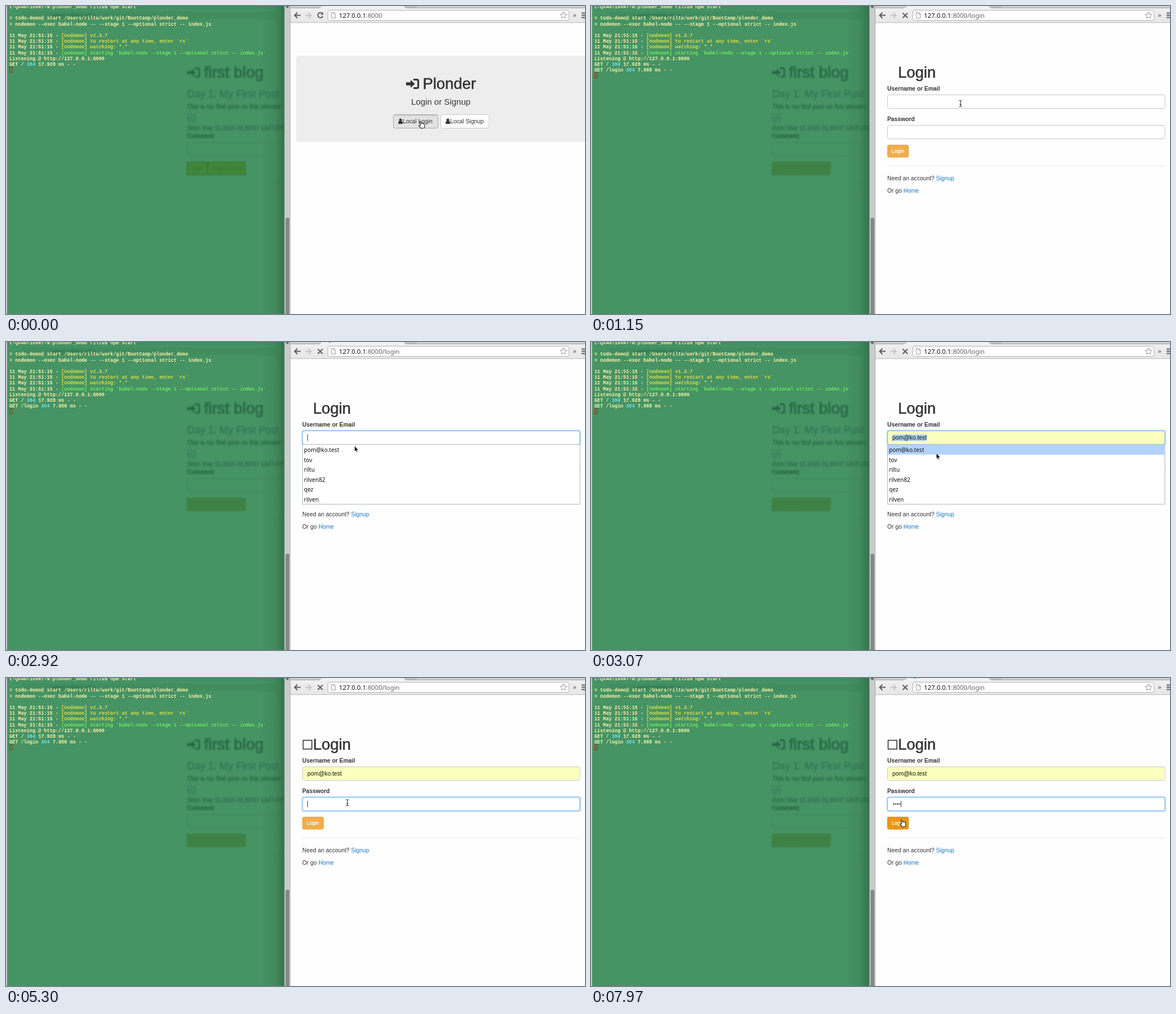
An HTML page for the animation above (8000 ms loop, 1026x546 px).

```html
<!DOCTYPE html>
<html lang="en">
<head>
<meta charset="utf-8">
<title>Login demo</title>
<style>
  html, body { margin: 0; width: 100%; height: 100%; overflow: hidden; background: #fff; }
  svg { display: block; width: 1026px; height: 546px; }
  text { white-space: pre; font: 10.3px "Liberation Sans", Arial, sans-serif; fill: #333; }
  .term text { font: bold 8.52px "Liberation Mono", "Courier New", monospace; fill: #fdf3a8; }
  .term .y { fill: #dede45; }
  .term .g { fill: #69ea62; }
  .term .c { fill: #74e0ee; }
  .ghost { filter: blur(.8px); }
  .ghost text { fill: #296a48; stroke: #296a48; stroke-width: .4px; }
  .ghost .big { font-size: 27.9px; stroke-width: .9px; }
  .ghost .post { font-size: 18.1px; fill: #33785a; stroke: #33785a; }
  .bar { fill: none; stroke: #5c5c5c; stroke-width: 2; }
  text.url { font: 11.3px "Noto Sans", "Open Sans", sans-serif; fill: #111; }
  .url tspan { fill: #606060; }
  text.h1 { font-size: 27.4px; stroke: #333; stroke-width: .5px; }
  text.lead { font-size: 15px; }
  text.bold { font-weight: bold; }
  text.email { fill: #111; }
  .link { fill: #1c78cc; }
  .field { fill: #fff; stroke: #c6c6c6; }
  .focus { fill: none; stroke: #66afe9; }
  .glow { fill: none; stroke: #66afe9; stroke-width: 3; opacity: .35; filter: blur(1px); }
  text.btn { font-size: 8.9px; fill: #fff; stroke: #fff; stroke-width: .25px; }
  .menu text { font: 10px "Noto Sans", "Open Sans", sans-serif; fill: #111; }
</style>
</head>
<body>
<svg viewBox="0 0 1026 546">
  <defs>
    <linearGradient id="shade">
      <stop offset="0" stop-color="#173f2a" stop-opacity="0"/>
      <stop offset=".55" stop-color="#173f2a" stop-opacity=".08"/>
      <stop offset="1" stop-color="#173f2a" stop-opacity=".36"/>
    </linearGradient>
    <linearGradient id="chrome" x2="0" y2="1">
      <stop offset="0" stop-color="#f2f2f2"/>
      <stop offset="1" stop-color="#e6e6e6"/>
    </linearGradient>
    <clipPath id="pane"><path d="M2 0H493V546H2Z"/></clipPath>
    <path id="signin" d="M0 7.2H8V3L15.5 10 8 17V12.8H0ZM13 1H19.5Q23 1 23 4.5V15.500Q23 19 19.500 19H13V16H18.500Q20 16 20 14.500V5.500Q20 4 18.500 4H13Z"/>
    <path id="user" d="M4 0a2.400 2.600 0 0 1 0 5.200a2.400 2.600 0 0 1 0-5.200M1.800 4.300Q4 6.600 6.200 4.300 8 4.800 8 8 8 9.500 6.700 9.500H1.300Q0 9.500 0 8 0 4.800 1.800 4.300Z"/>
  </defs>

  <!-- terminal -->
  <rect width="503" height="546" fill="#c9cdca"/>
  <g clip-path="url(#pane)">
    <rect x="2" width="491" height="546" fill="#469364"/>
    <g class="ghost">
      <path d="M2 0H493V5H2ZM30 10H480V24H30Z" fill="#347d55" opacity=".22"/>
      <path d="M82 14H158V20H82Z" fill="#296a48" opacity=".35"/>
      <use href="#signin" x="321" y="108" fill="#296a48"/>
      <text class="big" x="351" y="127">first blog</text>
      <text class="post" x="321" y="162">Day 1: My First Post</text>
      <text x="321" y="182" style="font-size:10.8px">This is my first post on this plonder</text>
      <path d="M322.500 192.500H335V204H322.500ZM324 202L328 197 331 200 333 198" fill="none" stroke="#377f62" stroke-width="1.500"/>
      <text x="321" y="220" opacity=".8">(Mon May 11 2015 01:49:07 GMT-0700</text>
      <text class="bold" x="321" y="234">Comment</text>
      <path d="M321 242H487M321 266H487M321 242V266" fill="none" stroke="#3b855a" opacity=".6"/>
      <path d="M473 313H490" stroke="#3b855a" stroke-dasharray="2" opacity=".6"/>
      <g data-on="0-240">
        <path d="M321 277H356V299H321ZM358 277H424V299H358Z" fill="#418639" stroke="#397c38" stroke-linejoin="round" stroke-width="2"/>
        <text x="330" y="291" style="font-size:8.900px" opacity=".45">Post</text>
        <text x="366" y="291" style="font-size:8.900px" opacity=".45">Login to Post</text>
      </g>
      <g data-on="240-8000">
        <rect x="320" y="276" width="105" height="24" rx="3" fill="#3f8145"/>
        <path d="M356.500 277V299" stroke="#397b46"/>
        <path d="M482 50V335" stroke="#6c9c42" stroke-width="3" opacity=".18"/>
      </g>
    </g>
    <rect x="452" width="41" height="546" fill="url(#shade)"/>
    <g class="term">
      <text x="6" y="3.900">L-QX40718VRT-N:plonder_demo riltu$ npm start</text>
      <text x="6" y="24.300">&gt; todo-demo@ start /Users/riltu/work/git/BootCamp/plonder_demo</text>
      <text x="6" y="34.500">&gt; nodemon --exec babel-node -- --stage 1 --optional strict -- index.js</text>
      <text x="6" y="54.900">11 May 21:51:15 - <tspan class="y">[nodemon] v1.3.7</tspan></text>
      <text x="6" y="65.100">11 May 21:51:15 - <tspan class="y">[nodemon] to restart at any time, enter `rs`</tspan></text>
      <text x="6" y="75.300">11 May 21:51:15 - <tspan class="y">[nodemon] watching: *.*</tspan></text>
      <text x="6" y="85.500">11 May 21:51:15 - <tspan class="g">[nodemon] starting `babel-node --stage 1 --optional strict -- index.js`</tspan></text>
      <text x="6" y="95.700">Listening @ http://127.0.0.1:8000</text>
      <text x="6" y="105.900">GET / <tspan class="c">304</tspan> 17.928 ms - -</text>
      <text x="6" y="116.100" data-on="240-8000">GET /login <tspan class="c">304</tspan> 7.888 ms - -</text>
      <rect id="prompt" x="6.500" width="4.500" height="9" fill="none" stroke="#963010"/>
    </g>
  </g>
  <path d="M493.500 0V546" stroke="#8fa398"/>
  <path d="M495.500 546V378.500a3.250 3.250 0 0 1 6.500 0V546Z" fill="#858585"/>
  <path d="M496 0H501V2L498.500 4 496 2Z" fill="#666"/>

  <!-- browser -->
  <rect x="503" width="523" height="546" fill="#fefefe"/>
  <rect x="503" width="523" height="30" fill="url(#chrome)"/>
  <path d="M503 0H559L556 3.500H503ZM705 0H1026V3.500H710Z" fill="#cfcfcf"/>
  <path d="M503 3.500H554Q557 3.500 559 0M705 0Q707 3.500 710 3.500H1026M707 0L709 2H726L728 0" fill="none" stroke="#a6a6a6"/>
  <path d="M503 29.500H1026" stroke="#bcbcbc"/>
  <path d="M503.500 0V546" stroke="#a9a9a9"/>
  <path id="spin" d="M-4 -4.500A6 6 0 0 1 4 -4.500" fill="none" stroke="#3c9be8" stroke-width="2"/>
  <path class="bar" d="M522 16.500H512M516.500 11.500L511.500 16.500 516.500 21.500"/>
  <path class="bar" d="M530 16.500H540M535.500 11.500L540.500 16.500 535.500 21.500" style="stroke:#c6c6c6"/>
  <g data-on="0-240">
    <path class="bar" d="M560.500 13.300A4.500 4.500 0 1 0 561.300 18"/>
    <path d="M562 10.800V15.500H557.300Z" fill="#5c5c5c"/>
  </g>
  <path class="bar" data-on="240-8000" d="M552.500 12.500L561 21M561 12.500L552.500 21"/>
  <rect x="570.500" y="7.500" width="427" height="18" rx="2.500" fill="#fff" stroke="#b4b4b4"/>
  <path d="M576.500 11.500H581L583.500 14V21.500H576.500ZM581 11.500V14H583.500" fill="#fafafa" stroke="#9b9b9b"/>
  <text class="url" x="590" y="20.500">127.0.0.1<tspan>:8000<tspan data-on="240-8000">/login</tspan></tspan></text>
  <path d="M988 10.300L989.800 14.300 994 14.700 990.800 17.500 991.800 21.800 988 19.500 984.200 21.800 985.200 17.500 982 14.700 986.200 14.300Z" fill="#fff" stroke="#9a9a9a"/>
  <text x="1004.500" y="20" style="font-size:11px;fill:#444">»</text>
  <path class="bar" d="M1020 12.500H1026M1020 16.500H1026M1020 20.500H1026"/>

  <!-- welcome page -->
  <g data-on="0-240">
    <rect x="514" y="88" width="520" height="153" rx="4.500" fill="#ededed"/>
    <use href="#signin" x="709" y="128" fill="#333"/>
    <text class="h1" x="738.500" y="147">Plonder</text>
    <text class="lead" x="718" y="174.500">Login or Signup</text>
    <rect x="686.500" y="192.500" width="79" height="24" rx="3" fill="#e3e3e3" stroke="#a8a8a8"/>
    <path d="M688 194H764.500" stroke="#cfcfcf" stroke-width="2"/>
    <rect x="770.500" y="192.500" width="85.500" height="24" rx="3" fill="#fff" stroke="#c9c9c9"/>
    <use href="#user" x="695" y="199.500" fill="#333"/>
    <text x="703" y="208.300">Local Login</text>
    <use href="#user" x="779" y="199.500" fill="#333"/>
    <text x="787" y="208.300">Local Signup</text>
  </g>

  <!-- login page -->
  <g data-on="240-8000">
    <rect data-on="3220-8000" x="526.500" y="110.500" width="15.500" height="15.500" fill="none" stroke="#333" stroke-width="1.600"/>
    <text class="h1" x="544" y="126.800">Login</text>
    <text class="bold" x="525" y="150">Username or Email</text>
    <text class="bold" x="525" y="204">Password</text>
    <rect class="glow" data-on="1600-4410" x="525" y="157" width="492.500" height="25" rx="3"/>
    <rect class="glow" data-on="4410-8000" x="525" y="211" width="492.500" height="25" rx="3"/>
    <rect class="field" x="525.500" y="157.500" width="491.500" height="24" rx="3"/>
    <rect class="field" x="525.500" y="211.500" width="491.500" height="24" rx="3"/>
    <rect data-on="2930-8000" x="526" y="158" width="490.500" height="23" rx="2.500" fill="#faffbd"/>
    <rect class="focus" data-on="1600-4410" x="525.500" y="157.500" width="491.500" height="24" rx="3"/>
    <rect class="focus" data-on="4410-8000" x="525.500" y="211.500" width="491.500" height="24" rx="3"/>
    <rect data-on="2930-3370" x="534" y="164" width="61" height="11.500" fill="#abd0ee"/>
    <text class="email" data-on="2930-8000" x="534" y="173">pom@ko.test</text>
    <g id="dots" fill="#444"></g>
    <path id="caret" data-on="1600-2480 2630-2930 3370-3820 4260-4850 5300-5740 5890-7230 7680-8000" d="M0 -6V5.500" stroke="#444"/>
    <rect data-on="0-7830" x="525.500" y="246.500" width="37" height="21.500" rx="2.500" fill="#f0ad4e" stroke="#eea236"/>
    <rect data-on="7830-8000" x="525.500" y="246.500" width="37" height="21.500" rx="2.500" fill="#ec9710" stroke="#d58512"/>
    <text class="btn" x="533" y="260.400">Login</text>
    <path d="M525 283.500H1018" stroke="#ebebeb"/>
    <text x="525" y="309">Need an account? <tspan class="link">Signup</tspan></text>
    <text x="525" y="331">Or go <tspan class="link">Home</tspan></text>
    <g class="menu" data-on="2630-3370">
      <rect x="525.500" y="181.500" width="491.500" height="106" fill="#fff" stroke="#a9b8cb"/>
      <rect data-on="2930-3370" x="526" y="182" width="490.500" height="17.700" fill="#b3d3fc"/>
      <g id="items"></g>
    </g>
  </g>

  <g id="pointer">
    <path data-kind="hand" transform="rotate(-12)" d="M-2 1.500V-5a1 1 0 0 1 2 0V-1.500q1-.9 1.900.2 1-.6 1.800.4 1.300-.4 1.500 1V3q0 1.500-1 3V7H-1.800V6Q-3.600 4-5 1.400-4.400-.2-2 1.500Z" fill="#fff" stroke="#111"/>
    <path data-kind="arrow" d="M0 0V10.500L2.300 8.300 3.800 11.700 5.500 11 4 7.700H7.200Z" fill="#111" stroke="#fff" stroke-width=".7"/>
    <path data-kind="beam" d="M-2.500 -5.500Q0 -5.500 0 -4 0 -5.500 2.500 -5.500M0 -4.500V4.500M-2.500 5.500Q0 5.500 0 4 0 5.500 2.500 5.500M-1.500 1.500H1.500" fill="none" stroke="#222"/>
  </g>
</svg>
<script>
  const LOOP = 8000, TICK = 148, PHASE = 406;
  const $ = id => document.getElementById(id);
  const place = (el, x, y, turn = 0) =>
    el.setAttribute('transform', `translate(${x} ${y}) rotate(${turn})`);

  function add(parent, tag, attrs, text = '') {
    const el = document.createElementNS('http://www.w3.org/2000/svg', tag);
    for (const k in attrs) el.setAttribute(k, attrs[k]);
    el.textContent = text;
    parent.append(el);
  }

  ['pom@ko.test', 'tov', 'riltu', 'rilven82', 'qez', 'rilven'].forEach((name, i) =>
    add($('items'), 'text', { x: 528, y: 195 + 17.5 * i }, name));

  // password keystrokes
  const keys = [5890, 6040, 6330, 6630];
  keys.forEach((t, i) =>
    add($('dots'), 'circle', { cx: 536.3 + 3.7 * i, cy: 223.3, r: 1.25, 'data-on': `${t}-${LOOP}` }));

  const timed = [...document.querySelectorAll('[data-on]')].map(el => ({
    el, spans: el.dataset.on.split(' ').map(s => s.split('-').map(Number))
  }));

  // pointer path: time, x, y, shape from then on
  const path = [
    [0, 736, 210, 'hand'], [400, 736, 210, 'arrow'], [1142, 655, 173, 'beam'],
    [2030, 624, 167, 'beam'], [2478, 624, 167, 'beam'], [2750, 618, 183, 'arrow'],
    [3070, 612, 197, 'arrow'], [3370, 611, 198, 'arrow'], [3810, 608, 213, 'beam'],
    [4250, 606, 221, 'beam'], [4700, 606, 221, 'beam'], [4846, 605, 221, 'beam'],
    [6620, 605, 221, 'beam'], [7510, 592, 227, 'beam'], [7640, 577, 238, 'arrow'],
    [7810, 560, 251, 'hand'], [7950, 552, 257, 'hand'], [LOOP, 552, 257, 'hand']
  ];

  function pointer(t) {
    const i = path.findIndex(p => p[0] > t) - 1;
    const [t0, x0, y0, kind] = path[i], [t1, x1, y1] = path[i + 1];
    const k = (t - t0) / (t1 - t0);
    place($('pointer'), x0 + (x1 - x0) * k, y0 + (y1 - y0) * k);
    for (const el of $('pointer').children)
      el.style.display = el.dataset.kind === kind ? '' : 'none';
  }

  function draw(t) {
    for (const { el, spans } of timed)
      el.style.display = spans.some(([a, b]) => t >= a && t < b) ? '' : 'none';

    const tick = t < PHASE ? 0 : PHASE + TICK * Math.floor((t - PHASE) / TICK);
    pointer(tick);
    $('prompt').setAttribute('y', t < 240 ? 108.5 : 118.5);

    const typed = keys.filter(k => t >= k).length;
    if (t < 4260) place($('caret'), t < 3370 ? 534.5 : 596.5, 169.5);
    else place($('caret'), 534.5 + 3.7 * typed, 223.5);

    const turn = (tick - 7954) / 1050 * 360 + 180;
    place($('spin'), 574, -6, turn);
    $('spin').style.display = t < 240 ? 'none' : '';
  }

  const start = performance.now();
  function frame() {
    draw((performance.now() - start) % LOOP);
    requestAnimationFrame(frame);
  }
  frame();
</script>
</body>
</html>
```
